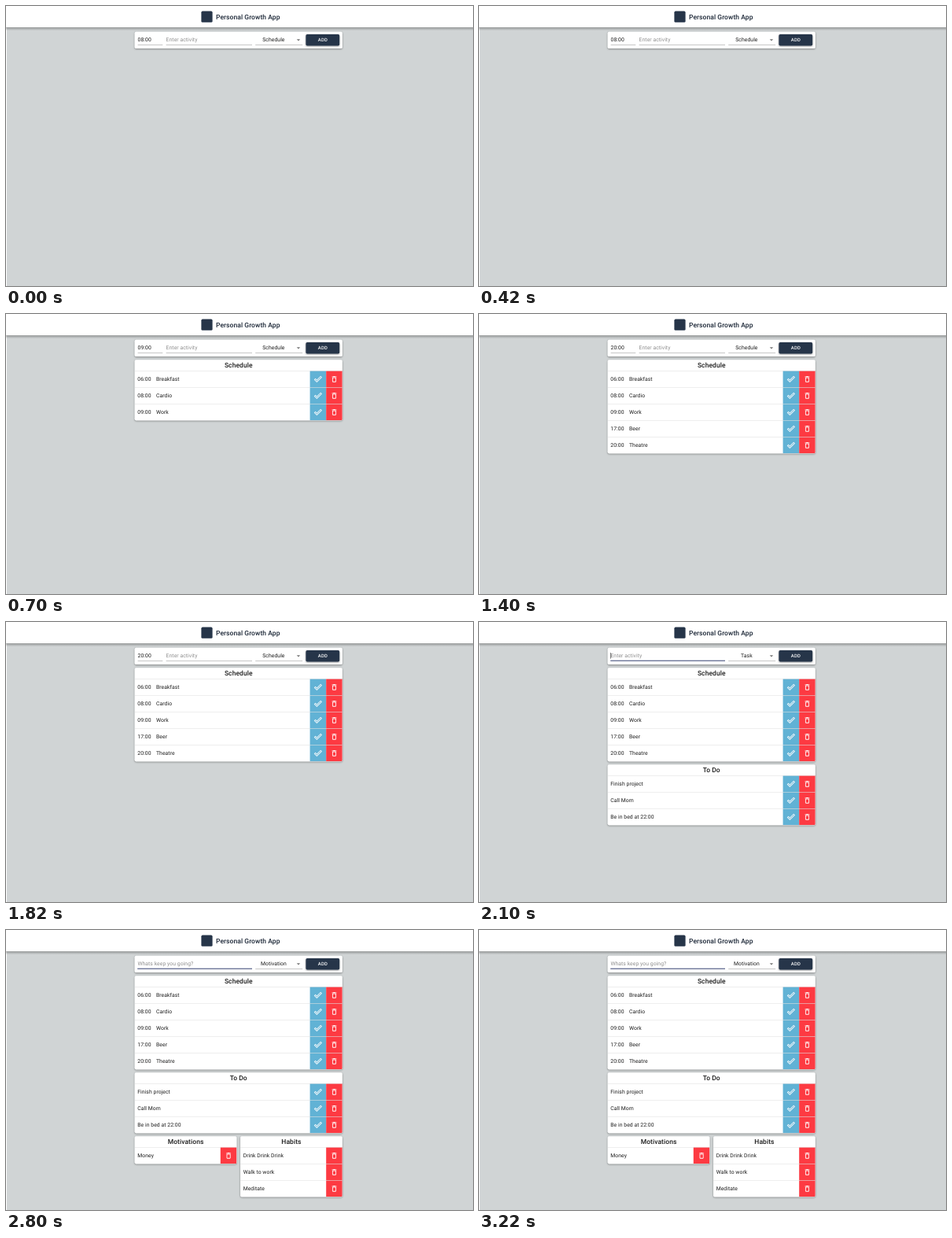
An HTML page that plays this animation: 594x356 px, repeating every 3.5 s.

```html
<!DOCTYPE html>
<html lang="en">
<head>
<meta charset="utf-8">
<title>Personal Growth App</title>
<style>
  html, body { margin: 0; width: 100%; height: 100%; overflow: hidden; background: #d0d4d5; }
  svg { display: block; width: 594px; height: 356px; }
  text {
    font: 400 6.8px Roboto, sans-serif;
    letter-spacing: .064px;
    fill: #1c1c1c;
    text-rendering: geometricPrecision;
    white-space: pre;
  }
  .title { font-weight: 500; font-size: 8.5px; fill: #1b2636; }
  .head { font-weight: 500; font-size: 8.5px; }
  .hint { fill: #8f8f8f; }
  .btn { font-weight: 500; font-size: 5.95px; letter-spacing: .17px; fill: #fff; }
  .mid { text-anchor: middle; }
  .card { fill: #fff; filter: url(#lift); }
</style>
</head>
<body>
<svg viewBox="0 0 594 356" xmlns="http://www.w3.org/2000/svg">
  <defs>
    <filter id="lift" x="-5%" y="-30%" width="110%" height="170%">
      <feDropShadow dx="0" dy=".8" stdDeviation=".9" flood-opacity=".42"/>
    </filter>
    <linearGradient id="shade" x2="0" y2="1">
      <stop offset="0" stop-opacity=".4"/>
      <stop offset=".4" stop-opacity=".16"/>
      <stop offset="1" stop-opacity="0"/>
    </linearGradient>
    <path id="check" d="M19.77 5.03l1.4 1.4L8.43 19.17l-5.6-5.6 1.4-1.4 4.2 4.2L19.77 5.03m0-2.83L8.43 13.54l-4.2-4.2L0 13.57 8.43 22 24 6.43 19.77 2.2z"/>
    <path id="bin" d="M6 19c0 1.1.9 2 2 2h8c1.1 0 2-.9 2-2V7H6v12zM8 9h8v10H8V9zm7.5-5l-1-1h-5l-1 1H5v2h14V4z"/>
  </defs>
  <rect width="594" height="356" fill="#d0d4d5"/>
  <rect width="1" height="356" fill="#fff"/>
  <rect y="27" width="594" height="4.5" fill="url(#shade)"/>
  <rect width="594" height="27.2" fill="#fff"/>
  <rect x="248.4" y="6.6" width="14.2" height="14.2" rx="1.6" fill="#263549"/>
  <text class="title" x="267" y="17">Personal Growth App</text>
  <g id="view"></g>
</svg>
<script>
const STEP = 700;
const LEFT = 163.7, RIGHT = 427.8, ROW = 21, HEAD = 14;
const view = document.getElementById('view');

const schedule = [
  ['06:00', 'Breakfast'], ['08:00', 'Cardio'], ['09:00', 'Work'],
  ['17:00', 'Beer'], ['20:00', 'Theatre']
];
const todo = ['Finish project', 'Call Mom', 'Be in bed at 22:00'];
const habits = ['Drink Drink Drink', 'Walk to work', 'Meditate'];

const states = [
  { time: '08:00', rows: 0 },
  { time: '09:00', rows: 3 },
  { time: '20:00', rows: 5 },
  { kind: 'Task', hint: 'Enter activity', caret: true, rows: 5, todo: true },
  { kind: 'Motivation', hint: 'Whats keep you going?', rows: 5, todo: true, extra: true }
];

const rect = (x, y, w, h, fill, rx = 0) =>
  `<rect x="${x}" y="${y}" width="${w}" height="${h}" rx="${rx}" fill="${fill}"/>`;
const label = (x, y, str, cls = '') => `<text class="${cls}" x="${x}" y="${y}">${str}</text>`;
const card = (x, y, w, h) =>
  `<rect class="card" x="${x}" y="${y}" width="${w}" height="${h}" rx="1.7"/>`;
const rule = (x1, x2) => rect(x1, 49.1, x2 - x1, .5, '#8c8c8c');

function cell(x, y, fill, icon) {
  return rect(x, y, 20.6, ROW, fill) +
    `<use href="#${icon}" fill="#fff" transform="translate(${x + 5.2} ${y + 5.5}) scale(.425)"/>`;
}

function list(x, right, y, title, items, checks) {
  const w = right - x, h = HEAD + items.length * ROW;
  const id = 'clip' + title.replace(' ', '');
  let out = card(x, y, w, h) + label((x + right) / 2, y + 10, title, 'head mid');
  out += `<clipPath id="${id}"><rect x="${x}" y="${y}" width="${w}" height="${h}" rx="1.7"/></clipPath>`;
  out += `<g clip-path="url(#${id})">`;
  items.forEach((item, i) => {
    const top = y + HEAD + i * ROW, base = top + 12.9;
    if (Array.isArray(item)) out += label(x + 3.6, base, item[0]) + label(x + 27.3, base, item[1]);
    else out += label(x + 3.6, base, item);
    if (checks) out += cell(right - 41.2, top, '#61b2d5', 'check');
    out += cell(right - 20.6, top, '#fd3a42', 'bin');
    out += rect(x, top, w, .5, '#dcdcdc');
  });
  return out + '</g>';
}

function form(s) {
  let out = card(LEFT, 32.7, RIGHT - LEFT, 21.3);
  if (s.time) {
    out += label(167.6, 45.3, s.time) + rule(167.6, 199.3);
    out += label(203.6, 45.3, 'Enter activity', 'hint') + rule(203.6, 313);
  } else {
    out += label(167.4, 45.3, s.hint, 'hint') + rect(167.2, 48.7, 145.8, 1, '#343f70');
    if (s.caret) out += rect(167.2, 39, .6, 7.6, '#222');
  }
  out += label(340.4, 45.3, s.kind || 'Schedule', 'mid') + rule(317.2, 377.2);
  out += '<path d="M369.8 42.2h4.4l-2.2 2.2z" fill="#757575"/>';
  out += `<g filter="url(#lift)">${rect(381.4, 36.1, 42.8, 14.4, '#263549', 1.7)}</g>`;
  return out + label(402.9, 45.4, 'ADD', 'btn mid');
}

function draw(s) {
  let out = form(s);
  if (s.rows) out += list(LEFT, RIGHT, 58.2, 'Schedule', schedule.slice(0, s.rows), true);
  if (s.todo) out += list(LEFT, RIGHT, 181.2, 'To Do', todo, true);
  if (s.extra) {
    out += list(LEFT, 293.4, 262.2, 'Motivations', ['Money'], false);
    out += list(298.1, RIGHT, 262.2, 'Habits', habits, false);
  }
  view.innerHTML = out;
}

let shown = -1;
const start = performance.now();
function tick() {
  const i = Math.floor((performance.now() - start) / STEP) % states.length;
  if (i !== shown) draw(states[shown = i]);
  requestAnimationFrame(tick);
}
tick();
</script>
</body>
</html>
```
